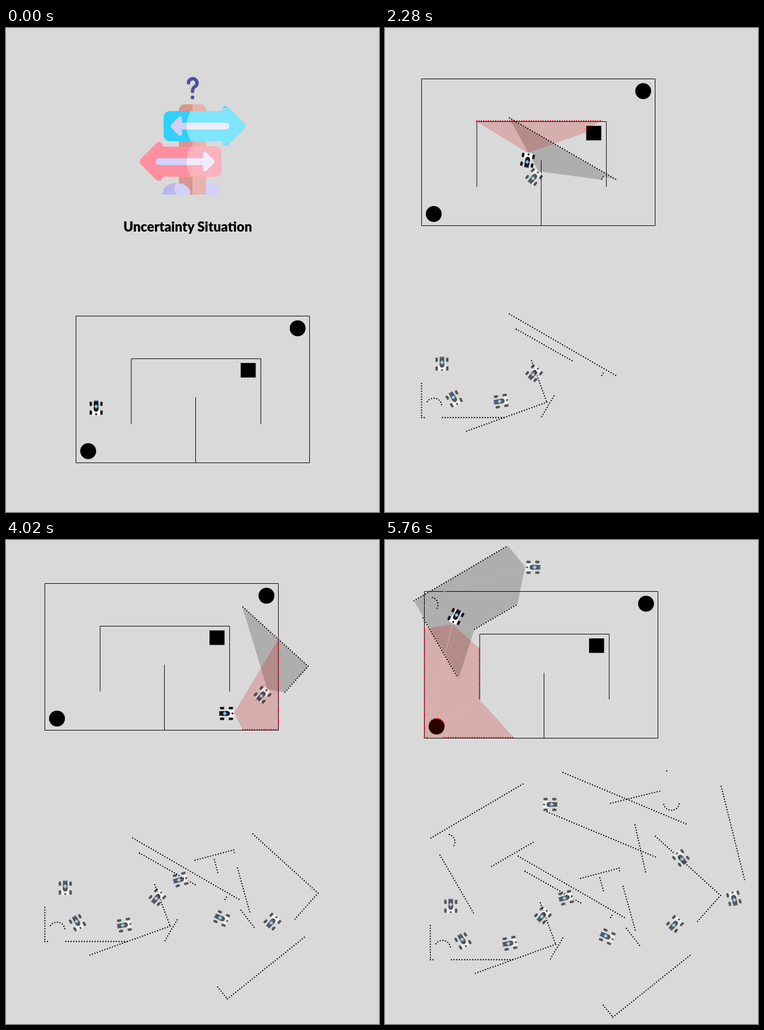
An HTML page that plays this animation: 658 px wide and 851 px high, repeating every 6.34 s.

```html
<!DOCTYPE html>
<html lang="en">
<head>
<meta charset="utf-8">
<title>Uncertainty Situation</title>
<style>
  html, body { margin: 0; width: 100%; height: 100%; overflow: hidden; background: #d9d9d9; }
  svg { display: block; width: 658px; height: 851px; }
  .step { display: none; }
  .step.on { display: inline; }
  .title { font: 900 23.5px Lato, "Open Sans", sans-serif; text-anchor: middle; }
  .wall { fill: none; stroke: #000; stroke-width: 1; }
  .dots { fill: none; stroke: #000; stroke-width: 2.3; stroke-linecap: round; stroke-dasharray: 0 4.7; }
  .red { stroke: #d00008; stroke-dasharray: 0 4.2; }
  .guess { fill: #000; fill-opacity: .2; }
  .view { fill: #c80000; fill-opacity: .2; }
  .seam { fill: none; stroke-width: .8; }
  .trail { fill: none; stroke-width: 1; stroke-dasharray: 4 2; }
  .ghost { opacity: .66; }
</style>
</head>
<body>
<svg viewBox="0 0 658 851">
  <defs>
    <g id="map">
      <path class="wall" d="M0 0H412V258H0ZM97.5 190V75H326V190M211 143V258"/>
      <circle cx="21.5" cy="237.5" r="14"/>
      <circle cx="391" cy="21.5" r="14"/>
      <rect x="290.5" y="82.5" width="26.5" height="25.5"/>
    </g>
    <g id="bot">
      <path d="M-9 -7.5H9M-9 8H9" stroke="#555" stroke-width="1.5"/>
      <path d="M-6 -13H6V-3L7 4V12Q7 13.5 5 13.5H-5Q-7 13.5 -7 12V4L-6 -3Z" fill="#fafafa" stroke="#aaa" stroke-width=".5"/>
      <g fill="#111">
        <rect x="-11.5" y="-11.5" width="4" height="7.5" rx="1"/>
        <rect x="7.5" y="-11.5" width="4" height="7.5" rx="1"/>
        <rect x="-11.5" y="4" width="4" height="7.5" rx="1"/>
        <rect x="7.5" y="4" width="4" height="7.5" rx="1"/>
        <circle cy="10.5" r="1.8"/>
      </g>
      <path d="M-4 -13H4L4.5 1Q4 6 0 6T-4.5 1Z" fill="#10131c"/>
      <path d="M-3 -12H3" stroke="#3a3f86" stroke-width="1.5"/>
      <path d="M0 -7L4 -3L0 1L-4 -3Z" fill="#58aacb"/>
      <circle cy="-3" r="1.6" fill="#9ad7ea"/>
    </g>
    <clipPath id="lit"><path d="M329 140Q308 172 329 204H430V140ZM329 204Q308 235 329 266H390V204Z"/></clipPath>
    <path id="sign1" d="M291 146H382V142Q383 137 389 138Q391 139 393 141L419 167Q425 172.500 419 178L393 204Q391 207 387 207Q382 206 382 199H291Q278 199 278 186V159Q278 146 291 146Z"/>
    <path id="sign2" d="M367 208.500H277V206Q275 200 269 200.500Q267 201 265 203L238 230Q233 235 238 240L265 267Q267 269 270 269Q276 268 277 261.500H367Q380 261.500 380 248V222Q380 208.500 367 208.500Z"/>
    <g id="arrows">
      <path d="M310 172.500H388M270 235H350" stroke="currentColor" stroke-width="12" stroke-linecap="round"/>
      <path d="M294 172.500L307 159V186ZM364.500 235L351 221.500V248.500Z" fill="currentColor" stroke="currentColor" stroke-width="7" stroke-linejoin="round"/>
    </g>
  </defs>
  <g class="step">
    <path d="M322 96.500A7.500 7.500 0 1 1 333.500 103Q329 105.500 329 111.500" fill="none" stroke="#49529d" stroke-width="6" stroke-linecap="round"/>
    <circle cx="329" cy="122" r="3.200" fill="#49529d"/>
    <path d="M340 293Q343 273 357 273Q376 275 379 293Z" fill="#d3d0fb"/>
    <path d="M305 293V146Q305 134 317 134H341Q353 134 353 146V293Z" fill="#d9958f"/>
    <path d="M329 293V134H341Q353 134 353 146V293Z" fill="#e8b4ae"/>
    <path d="M276 293Q276 273 300 273H315V293Z" fill="#b9b8ec"/>
    <path d="M301 293Q293 283 300 273Q323 275 325 288V293Z" fill="#d3d0fb"/>
    <use href="#sign1" fill="#2fd0fb"/>
    <use href="#sign2" fill="#ff8f9e"/>
    <use href="#arrows" color="#d3d0fb"/>
    <g clip-path="url(#lit)">
      <use href="#sign1" fill="#7ee5fb"/>
      <use href="#sign2" fill="#fdb1bd"/>
      <use href="#arrows" color="#efecfd"/>
    </g>
    <text class="title" x="320.500" y="358">Uncertainty Situation</text>
    <use href="#map" x="123.500" y="506.500"/>
    <use href="#bot" transform="translate(159 668.500)"/>
  </g>
</svg>
<script>
const FIRST = 540, HOLD = 580, LOOP = 6340;
const svg = document.querySelector("svg");
const scans = [];

const move = ([x, y], body) => `<g transform="translate(${x} ${y})">${body}</g>`;
const line = (cls, d, extra = "") => d ? `<path class="${cls}" d="${d}" ${extra}/>` : "";
const poly = (cls, pts) => pts ? `<polygon class="${cls}" points="${pts}"/>` : "";
const bot = ([x, y, turn], cls = "") =>
  `<use href="#bot" class="${cls}" transform="translate(${x} ${y}) rotate(${turn})"/>`;

// Each step adds one scan: dots and a pose in log space, shown below and again above.
function step(s) {
  const { scan, map, log, top, nudge = [0, 0] } = s;
  scans.push(scan);

  const above = poly("guess", s.guess)
    + move(map, `<use href="#map"/>` + poly("view", s.view))
    + (top ? move(top, line("dots", scan.d) + line("dots", scan.wall)) : "")
    + move(map, line("dots red", s.hits) + (s.trails || ""))
    + (s.seams || "")
    + (top ? move(top, bot(s.ghost || scan.pose, "ghost")) : "")
    + move(map, s.bots.map(b => bot(b)).join(""));

  let dots = "", bots = "";
  scans.forEach((c, i) => {
    const last = i === scans.length - 1;
    const shift = last ? nudge : [0, 0];
    const loose = c.loose || [0, 0];
    dots += move(shift, line("dots", c.d) + move(loose, line("dots", c.wall)));
    bots += move(last && s.carry ? shift : [0, 0], move(loose, bot(c.logPose || c.pose, "ghost")));
  });
  const g = document.createElementNS("http://www.w3.org/2000/svg", "g");
  g.setAttribute("class", "step");
  g.innerHTML = above + move(log, dots + bots);
  svg.append(g);
}

step({
  scan: { pose: [116, 644, 0], d: "M80 678V738M80 738H88M117 738H226M90 710A14 14 0 0 1 115.5 719" },
  map: [82.5, 74.5], log: [2, -24], bots: [[35.5, 162, 0]],
  view: "35,177 0,197 0,258 145,258",
  hits: "M0 197V258M0 258H8M36 258H145M10 229.5A14 14 0 0 1 35.5 238.5"
});

step({
  scan: { pose: [157, 692, -60], logPose: [137.5, 705, -30], d: "M274 638L301 711M301 711L159 762" },
  map: [65.5, 94.5], log: [-15, -72], top: [-32, -374], nudge: [-31, 17],
  bots: [[35.5, 162, 0], [74.5, 209, -50]],
  guess: "241,264 269,337 127,388 133,347",
  view: "84,221 211,177 211,257 62,257",
  hits: "M211 177V257M211 257H62",
  trails: line("trail", "M35.500 177Q32 202 53 214", 'stroke="#e00000"')
    + line("trail", "M37.500 177Q46 199 65 203", 'stroke="#222"')
});

step({
  scan: { pose: [220.5, 709, -100], d: "M247 582.5L347 639M247 583L246 587M313.500 700L291 738" },
  map: [63.5, 88.5], log: [-16.5, -54], top: [-16.5, -393],
  bots: [[135.5, 194.5, -130]],
  guess: "231,190 330,246 275,345 217,313",
  view: "97,73 210,73 210,187 145,187",
  hits: "M97 73H210M97 73V78M211 142V187"
});

step({
  scan: { pose: [278.5, 660, -140], d: "M235 556L426 666M398 664L401 659" },
  map: [64.5, 89.5], log: [-15.5, -53], top: [-15.5, -398],
  bots: [[187, 143, -170]],
  guess: "219,158 410,268 386,261 382,267 271,252",
  view: "187,130 97,75 316,75 291,88 291,94",
  hits: "M97 74H316M291 88V94"
});

step({
  scan: { pose: [319.5, 629, -105], d: "M345 595L413 577M413 577L414 582M379 594L386 620M420 609L442 688" },
  map: [65.5, 79.5], log: [-14.5, -54], top: [-15, -404],
  bots: [[223.5, 101.5, -90]],
  guess: "330,190 398,172 427,284 319,222",
  view: "238,102 257,74 327,74 327,190",
  hits: "M257 74H327M326.500 75V190M291 82V108"
});

step({
  scan: { pose: [392, 697.5, -65], d: "M426 683L450 714M402 839L541 728M385 818L402 839" },
  map: [67.5, 78.5], log: [-12.5, -32], top: [-22.5, -432],
  bots: [[292, 141, -27]],
  guess: "362,386 379,407 518,296 427,282 403,251 381,270",
  view: "298,153 211,231 211,258 389,258 326,190 326,151",
  hits: "M211 231V258M211 258H389M326 151V190"
});

step({
  scan: { pose: [511.5, 675, -138], d: "M477 521L592 625M592 625L550 672" },
  map: [68.5, 76.5], log: [-11.5, -32], top: [-59, -403], nudge: [-30, 28], carry: true,
  bots: [[320.5, 228.5, -90]],
  guess: "417,118 533,222 491,268 461,262",
  view: "334,227 412,98 412,257 349,257",
  hits: "M412 98V257M349 257H412"
});

step({
  scan: {
    pose: [527.5, 604, 166], loose: [88, 26], wall: "M505 407L547 574",
    d: "M441 501L460 585M398 463L487 441M497 406L501 405M519 464A14 14 0 0 1 491.5 464"
  },
  map: [69.5, 85.5], log: [-11.5, -3], top: [-29, -399],
  bots: [[385.5, 195.5, 180]],
  guess: "518,175 476,8 369,64 412,102 431,186 495,191",
  view: "385,182 412,172 412,0 285,0 326,75 326,162",
  hits: "M412 0V172M285 0H377M326 75V162M405 25A14 14 0 0 1 377.5 25"
});

step({
  scan: { pose: [522, 559, 140], d: "M314 409L533 500M286 478L481 559" },
  map: [71.5, 107.5], log: [-9, 2], top: [-27, -401],
  bots: [[348.5, 54, 117]],
  guess: "287,8 506,99 486,148 455,157 259,76",
  view: "97,-1 334,-1 334,50 309,74 97,74",
  hits: "M97 -1H334M97 73.500H309",
  seams: line("seam", "M168 106L405 157", 'stroke="#c99494"')
});

step({
  scan: {
    pose: [291, 465, 90],
    d: "M81 524L245 428M97 554L158 659M188 574L264 530M113.500 518A13.500 13.500 0 0 1 119.500 540.500"
  },
  map: [69.5, 90.5], log: [0, 0], top: [-30, -417],
  bots: [[55.5, 44, 27]],
  guess: "51,107 217,10 247,47 234,112 158,156 130,243",
  view: "50,58 0,65 0,257 158,257 97,190 97,100",
  hits: "M0 65V257M0 257H5M34 257H158M97 100V190M10 229.5A14 14 0 0 1 35.5 238.5",
  seams: line("seam", "M51 107L247 47M51 107L158 156", 'stroke="#b9b9b9"')
    + line("seam", "M119 148L78 315M104 320L166 281", 'stroke="#d9bcbc"')
});

const steps = [...document.querySelectorAll(".step")];
let shown = -1;

function draw(now) {
  const t = now % LOOP;
  const k = t < FIRST ? 0 : 1 + Math.floor((t - FIRST) / HOLD);
  if (k !== shown) {
    steps.forEach((g, i) => g.classList.toggle("on", i === k));
    shown = k;
  }
}

const start = performance.now();
function tick() {
  draw(performance.now() - start);
  requestAnimationFrame(tick);
}
tick();
</script>
</body>
</html>
```
